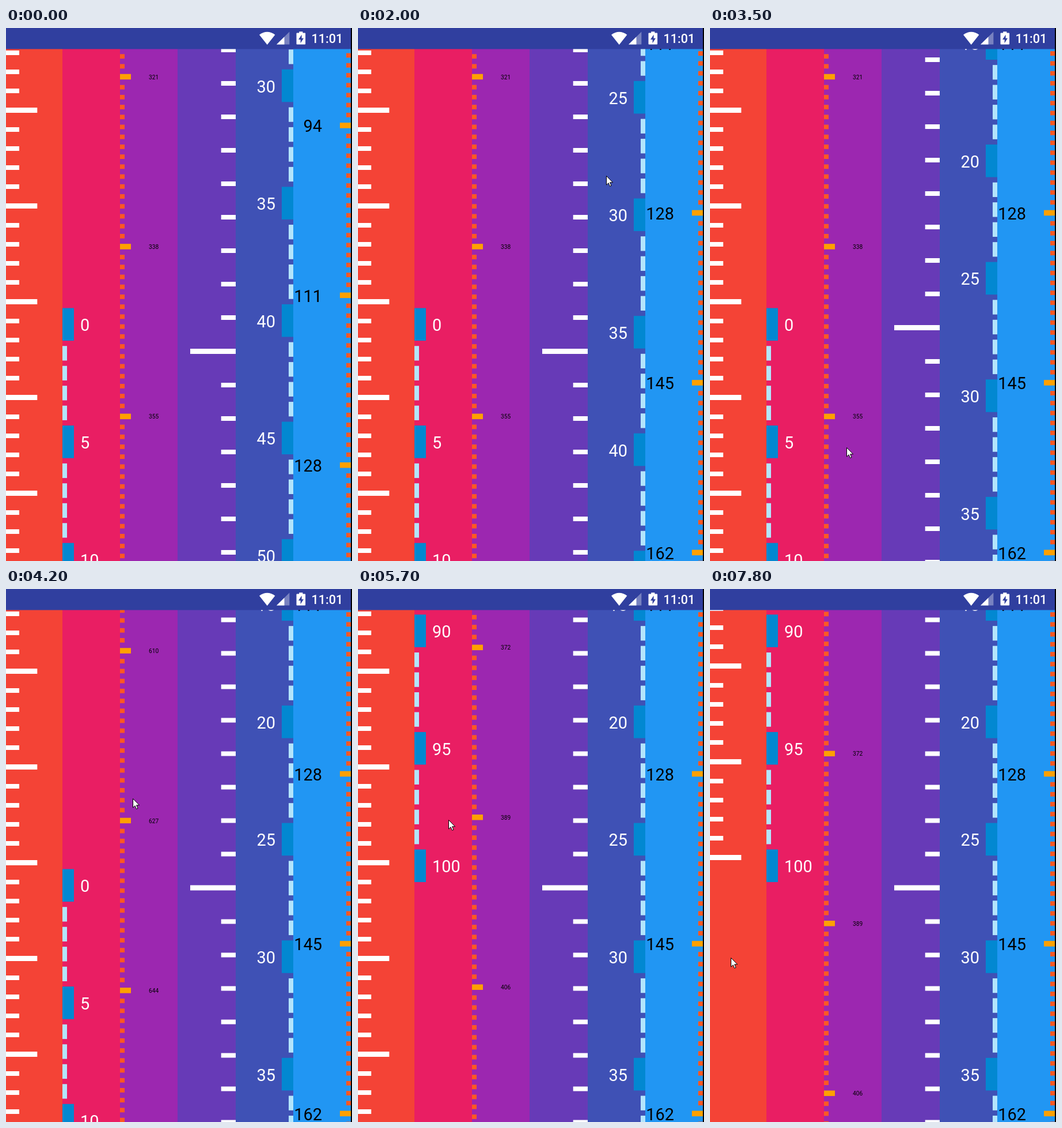
Animation of 601 by 924 pixels, one loop 8000 ms. Source, as an HTML page:

```html
<!DOCTYPE html>
<html lang="en">
<head>
<meta charset="utf-8">
<title>Scrolling rulers</title>
<style>
  html, body { margin: 0; width: 100%; height: 100%; overflow: hidden; background: #000; }
  svg { display: block; width: 601px; height: 924px; }
  text { font-family: Roboto, "Noto Sans", sans-serif; }
</style>
</head>
<body>
<svg viewBox="0 0 601 924">
  <g id="rulers"></g>
  <path d="M599 0h2v924h-2z" fill="#000"/>
  <path d="M0 0h599v36.5H0z" fill="#303f9f"/>
  <g fill="#fff">
    <path d="M453.7 29 440 11.8Q453.7 1.6 467.4 11.8Z"/>
    <path d="M470 28.5 492.4 6.5V28.5Z" opacity=".35"/>
    <path d="M470 28.5 483.5 15.2V28.5Z"/>
    <path d="M505.5 8.6h3.7V6.3h6.2v2.3h3.7q1 0 1 1v18q0 1-1 1h-13.6q-1 0-1-1v-18q0-1 1-1z"/>
    <path d="M513.6 11.5 508 20h3.6v6.2l5.4-8.5h-3.4z" fill="#303f9f"/>
    <text x="530.5" y="26.2" font-size="21.6" font-weight="500">11:01</text>
  </g>
  <path id="cursor" d="M.5.5V16L4.1 12.7 6.5 18.4 9 17.3 6.6 11.8H11.6Z" fill="#fff" stroke="#000"/>
</svg>
<script>
const LOOP = 8000, STEP = 100;

// Each fling decelerates from start to end; a higher power brakes harder.
const fling = (start, end, distance, power = 1.6) => t => {
  const u = Math.min(1, Math.max(0, (t - start) / (end - start)));
  return distance * (1 - (1 - u) ** power);
};

// Ticks are { w, h, fill }; parts counts the gaps between two majors.
const white = (w, h) => ({ w, h, fill: '#fff' });
const blue = {
  major: { w: 20, h: 56.5, fill: '#0288d1' }, minor: { w: 8, h: 25.3, fill: '#b3e5fc' },
  gap: 9.18, parts: 5, ink: '#fff', size: 28.9, margin: 31
};
const orange = {
  major: { w: 19, h: 9.5, fill: '#ffa000' }, minor: { w: 8, h: 7.8, fill: '#ff5722' },
  gap: 9.42, parts: 17, ink: '#000', size: 28.9, margin: 50
};

// y is the centre of major 0, which carries the value label.
const rulers = [
  { fill: '#f44336', major: white(54.3, 9), minor: white(23, 8), gap: 25, parts: 5,
    y: 142.5, to: 17, flings: [fling(6700, 7600, -2499)] },
  { ...blue, fill: '#e91e63', y: 513.8, label: 0, from: 0, to: 20,
    flings: [fling(5000, 5700, -4106)] },
  { ...orange, fill: '#9c27b0', y: 84.5, label: 321, size: 10.2,
    flings: [fling(3650, 4400, -5666.7), fling(4450, 6300, 4984.2, 2.93)] },
  { fill: '#673ab7', major: white(79, 9), minor: white(25.3, 8), gap: 50, parts: 10,
    y: 560.5, right: true, flings: [fling(2700, 3600, -623.5, 2.74)] },
  { ...blue, fill: '#3f51b5', y: 100, label: 30, right: true,
    flings: [fling(1800, 2500, 537.5)] },
  { ...orange, fill: '#2196f3', y: 168.9, label: 94, right: true,
    flings: [fling(250, 1700, -437.3, 1.5)] }
];

// Pointer stops; lift is how far it swings up on the way there.
const stops = [
  { t: 300, x: 530, y: 520 }, { t: 1300, x: 508, y: 201 }, { t: 1800, x: 448, y: 150 },
  { t: 2500, x: 363, y: 683 }, { t: 3500, x: 237, y: 727, lift: 380 },
  { t: 4500, x: 215, y: 727, lift: 450 }, { t: 4900, x: 164, y: 784 },
  { t: 5700, x: 157, y: 400 }, { t: 6300, x: 60, y: 737 }, { t: 6700, x: 60, y: 737 },
  { t: 7600, x: 30, y: 633, lift: 350 }, { t: 7800, x: 36, y: 639 }
];

function add(parent, tag, attrs, content = '') {
  const el = document.createElementNS('http://www.w3.org/2000/svg', tag);
  for (const key in attrs) el.setAttribute(key, attrs[key]);
  el.textContent = content;
  return parent.appendChild(el);
}

const columnEdge = i => Math.max(0, Math.round(i * 100.2 - 2.2));

function build(ruler, column) {
  const { major, minor, gap, parts, right, label, size, margin, from = -4, to = 23 } = ruler;
  const root = document.getElementById('rulers');
  const left = columnEdge(column), end = columnEdge(column + 1);
  const period = major.h + (parts - 1) * minor.h + parts * gap;
  add(root, 'rect', { x: left, width: end - left, height: '100%', fill: ruler.fill });
  ruler.group = add(root, 'g');

  const tick = ({ w, h, fill }, y) =>
    add(ruler.group, 'rect', { x: right ? end - w : left, y, width: w, height: h, fill });

  for (let i = from; i <= to; i++) {
    const mid = ruler.y + i * period;
    tick(major, mid - major.h / 2);
    for (let k = 0; i < to && k < parts - 1; k++) {
      tick(minor, mid + major.h / 2 + gap + k * (minor.h + gap));
    }
    if (label !== undefined) {
      add(ruler.group, 'text', {
        x: right ? end - margin : left + margin, y: mid + size * 0.4,
        fill: ruler.ink, 'font-size': size, 'text-anchor': right ? 'end' : 'start'
      }, label + i * parts);
    }
  }
}

function pointer(t) {
  const last = stops[stops.length - 1];
  const b = stops.find(s => s.t > t) || last;
  const a = stops[Math.max(0, stops.indexOf(b) - 1)];
  const u = Math.min(1, Math.max(0, (t - a.t) / (b.t - a.t || 1)));
  const ease = u * u * (3 - 2 * u);
  return [
    a.x + (b.x - a.x) * ease,
    a.y + (b.y - a.y) * ease - (b.lift || 0) * Math.sin(Math.PI * u)
  ].map(Math.round);
}

const cursor = document.getElementById('cursor');
const begin = performance.now();

function draw() {
  const elapsed = (performance.now() - begin) % LOOP;
  const t = Math.floor(elapsed / STEP) * STEP;
  for (const { group, flings } of rulers) {
    const shift = flings.reduce((sum, f) => sum + f(t), 0);
    group.setAttribute('transform', `translate(0 ${shift.toFixed(2)})`);
  }
  cursor.setAttribute('transform', `translate(${pointer(t)})`);
  cursor.setAttribute('visibility', t < stops[0].t ? 'hidden' : 'visible');
  requestAnimationFrame(draw);
}

rulers.forEach(build);
draw();
</script>
</body>
</html>
```
